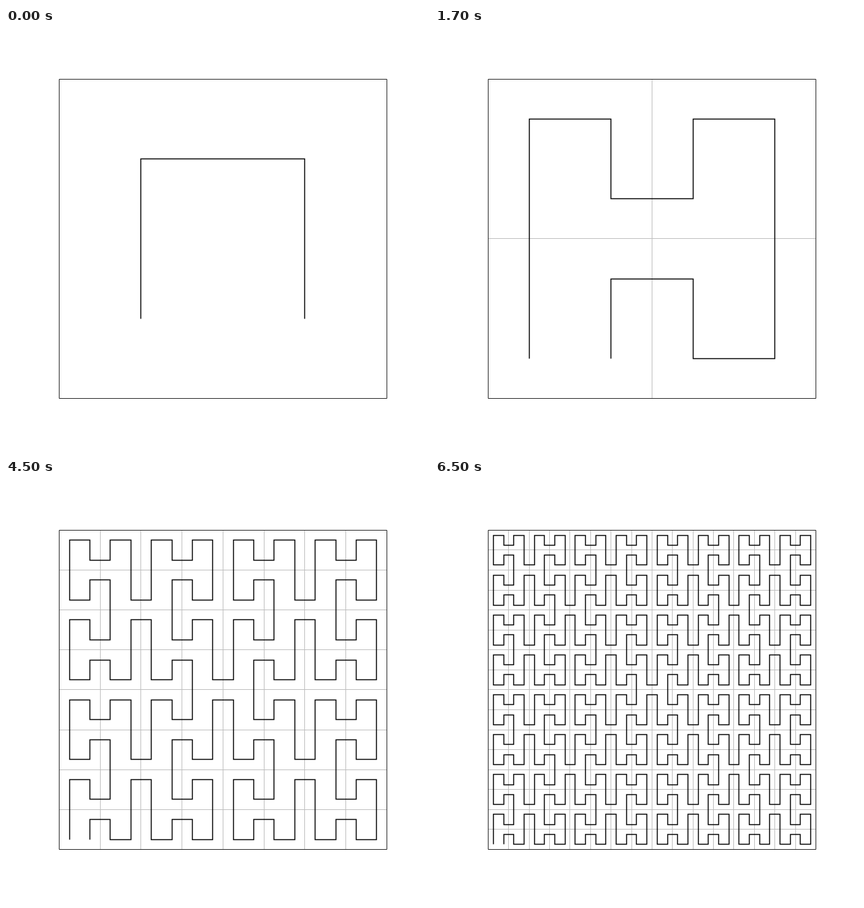
These frames come from a looping animation (648 px wide and 648 px high, 8 s). An HTML page with a canvas:

```html
<!DOCTYPE html>
<html lang="en">
<head>
<meta charset="utf-8">
<title>Space-filling loop</title>
<style>
html, body { margin: 0; width: 100%; height: 100%; overflow: hidden; background: #fff; }
canvas { display: block; }
</style>
</head>
<body>
<canvas id="stage" width="648" height="648"></canvas>
<script>
const ctx = document.getElementById('stage').getContext('2d');
const LEFT = 81, TOP = 77.9, WIDTH = 502, HEIGHT = 489;
const LOOP = 8000, FIRST = 500, STEP = 2000;

// Snap a fraction of the box to a pixel centre
const px = u => Math.round(LEFT + WIDTH * u - 0.01) + 0.5;
const py = v => Math.round(TOP + HEIGHT * v) + 0.5;

// Neighbours of each cell of a closed curve over an n by n grid
function closedCurve(n) {
  const links = Array.from({ length: n * n }, () => new Set());
  const id = (x, y) => y * n + x;
  const join = (a, b) => { links[a].add(b); links[b].add(a); };
  const cut = (a, b) => { links[a].delete(b); links[b].delete(a); };

  for (let y = 0; y < n; y += 2) {
    for (let x = 0; x < n; x += 2) {
      join(id(x, y), id(x + 1, y));
      join(id(x, y + 1), id(x + 1, y + 1));
      join(id(x, y), id(x, y + 1));
      join(id(x + 1, y), id(x + 1, y + 1));
    }
  }
  // Merge four loops at a time around their common corner
  for (let half = 2; half < n; half *= 2) {
    for (let cy = half; cy < n; cy += 2 * half) {
      for (let cx = half; cx < n; cx += 2 * half) {
        for (const y of [cy - 1, cy]) {
          cut(id(cx - 2, y), id(cx - 1, y));
          cut(id(cx, y), id(cx + 1, y));
          join(id(cx - 1, y), id(cx, y));
        }
        for (const x of [cx - 2, cx + 1]) join(id(x, cy - 1), id(x, cy));
      }
    }
  }
  return links;
}

// Walk from the bottom left cell up and round to the cell beside it
function curvePath(n) {
  const links = closedCurve(n), path = new Path2D();
  let last = n * (n - 1) + 1, cell = last - 1;
  for (let i = 0; i < n * n; i++) {
    path.lineTo(px((cell % n + 0.5) / n), py((Math.floor(cell / n) + 0.5) / n));
    const next = [...links[cell]].find(c => c !== last);
    last = cell;
    cell = next;
  }
  return path;
}

function gridPath(parts) {
  const path = new Path2D();
  for (let i = 1; i < parts; i++) {
    const x = px(i / parts), y = py(i / parts);
    path.moveTo(x, py(0));
    path.lineTo(x, py(1));
    path.moveTo(px(0), y);
    path.lineTo(px(1), y);
  }
  return path;
}

const levels = [2, 4, 8, 16, 32].map(n => ({ curve: curvePath(n), grid: gridPath(n / 2) }));

function stroke(path, color, width) {
  ctx.strokeStyle = color;
  ctx.lineWidth = width;
  ctx.stroke(path);
}

const frame = new Path2D();
frame.rect(px(0), py(0), px(1) - px(0), py(1) - py(0));

function draw(now) {
  const t = now % LOOP;
  const level = levels[t < FIRST ? 0 : 1 + Math.floor((t - FIRST) / STEP)];
  ctx.fillStyle = '#fff';
  ctx.fillRect(0, 0, 648, 648);
  stroke(level.grid, '#bebebe', 1);
  stroke(frame, '#222', 1);
  stroke(level.curve, '#000', 1.5);
  requestAnimationFrame(draw);
}
requestAnimationFrame(draw);
</script>
</body>
</html>
```
